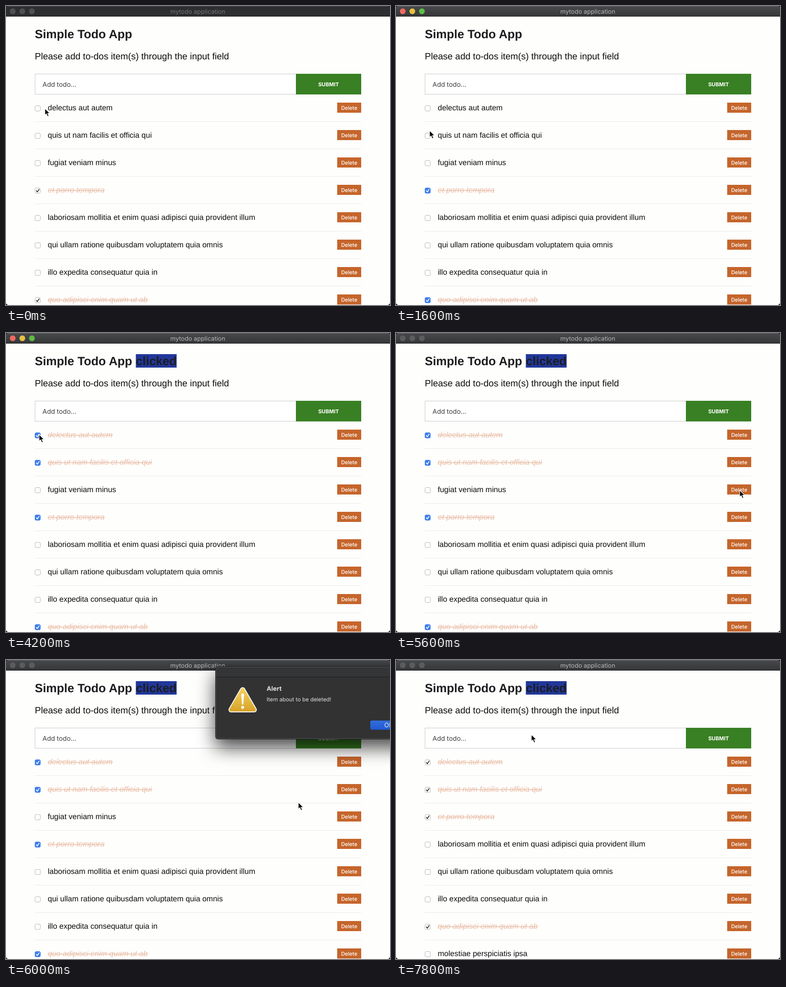
Recreate the animation shown at these times as an HTML page. Size 800 by 622 pixels, loop 8 s.

```html
<!DOCTYPE html>
<html lang="en">
<head>
<meta charset="utf-8">
<title>Todo app</title>
<style>
  html, body { margin: 0; width: 100%; height: 100%; overflow: hidden; background: #000; }
  svg { display: block; width: 800px; height: 622px; }
  text { font-family: "Liberation Sans", Arial, sans-serif; font-size: 16px; fill: #0c0c0c; text-rendering: geometricPrecision; }
  .ui { font-family: Inter, Roboto, sans-serif; }
  .mid { text-anchor: middle; }
  .done { font-style: italic; fill: #eabfa9; text-decoration: line-through; }
  .dialog { filter: drop-shadow(0 17px 19px rgba(0, 0, 0, .72)); }
</style>
</head>
<body>
<svg viewBox="0 0 800 622">
  <defs>
    <linearGradient id="bar" x2="0" y2="1"><stop stop-color="#48494b"/><stop offset="1" stop-color="#353637"/></linearGradient>
    <linearGradient id="gold" x2="0" y2="1"><stop stop-color="#f3cf5c"/><stop offset="1" stop-color="#d9a62b"/></linearGradient>
    <linearGradient id="blue" x2="0" y2="1"><stop stop-color="#336fdf"/><stop offset="1" stop-color="#2159d0"/></linearGradient>
    <linearGradient id="press" x2="0" y2="1"><stop stop-color="#4783ef"/><stop offset="1" stop-color="#326ee7"/></linearGradient>
  </defs>
  <rect width="800" height="622" rx="5" fill="#fefefd"/>
  <g id="scene"></g>
</svg>
<script>
const LOOP = 8000, STEP = 200;
const FOCUS = 1000, CHECK_2 = 2200, CHECK_1 = 3600, PRESS_DELETE = 5600,
      OPEN = 5800, PRESS_OK = 7000, CLOSE = 7200;

// text, time at which it is ticked, time at which it is removed
const todos = [
  ['delectus aut autem', CHECK_1],
  ['quis ut nam facilis et officia qui', CHECK_2],
  ['fugiat veniam minus', LOOP, CLOSE],
  ['et porro tempora', 0],
  ['laboriosam mollitia et enim quasi adipisci quia provident illum', LOOP],
  ['qui ullam ratione quibusdam voluptatem quia omnis', LOOP],
  ['illo expedita consequatur quia in', LOOP],
  ['quo adipisci enim quam ut ab', 0],
  ['molestiae perspiciatis ipsa', LOOP]
];

// time, x, y of the pointer tip
const path = [
  [0, 81, 213], [800, 81, 213], [1600, 70, 259], [2200, 69, 263],
  [3000, 81, 216], [3400, 69, 211], [4200, 69, 211], [5400, 716, 327],
  [5600, 716, 327], [6000, 609, 296], [6800, 784, 138], [7000, 786, 139],
  [7200, 786, 139], [7800, 282, 155], [8000, 282, 155]
];

const scene = document.getElementById('scene');
const rect = (x, y, w, h, fill, more = '') =>
  `<rect x="${x}" y="${y}" width="${w}" height="${h}" fill="${fill}" ${more}/>`;
const text = (x, y, str, style = '', cls = '') =>
  `<text x="${x}" y="${y}" class="${cls}" style="${style}">${str}</text>`;

function titleBar(t) {
  const fresh = t < FOCUS, active = !fresh && t < PRESS_DELETE;
  const lights = active ? ['#ed6a5e', '#e6c043', '#5cbc45'] : Array(3).fill(fresh ? '#505153' : '#5b5c5e');
  return `<path d="M0 22V5Q0 0 5 0H795Q800 0 800 5V22z" fill="${fresh ? '#2d2e2f' : 'url(#bar)'}"/>` +
    rect(4, 0, 792, 1, fresh ? '#4a4b4c' : '#68696a') + rect(0, 21, 800, 1, '#1b1b1c') +
    lights.map((c, i) => `<circle cx="${14 + 20 * i}" cy="11" r="6" fill="${c}"/>`).join('') +
    text(399.5, 16, 'mytodo application', `font-size:12.7px;fill:${fresh ? '#747576' : '#b9babb'}`, 'ui mid');
}

function header(t) {
  const badge = t < CHECK_2 ? '' :
    rect(270.5, 44, 85, 28, t < CHECK_1 ? '#e64bc0' : '#21379a') +
    text(270.6, 67, 'clicked', 'font-weight:bold;font-size:25px;fill:#1d1d20');
  return text(60, 67, 'Simple Todo App', 'font-weight:bold;font-size:25px;fill:#1d1d20') + badge +
    text(60, 110.7, 'Please add to-dos item(s) through the input field', 'font-size:19px') +
    rect(60.5, 141.5, 544, 42, '#fff', 'stroke="#c9c9c9"') +
    text(76, 168, 'Add todo...', 'font-size:13.6px;fill:#3c3c3c', 'ui') +
    rect(604, 141, 136, 43, '#388023') +
    text(672, 167, 'SUBMIT', 'font-size:11px;font-weight:700;fill:#fff', 'ui mid');
}

function checkbox(y, on, active) {
  const fill = on && active ? '#3f80ee' : '#fff';
  const edge = on && active ? '#3877e4' : '#b9b9b9';
  const tick = on ? `<path d="M63.2 ${y + .3}l2.1 2.6 3.8-5.8" fill="none" stroke="${active ? '#fff' : '#222'}" stroke-width="1.6" stroke-linecap="round" stroke-linejoin="round"/>` : '';
  return rect(60.5, y - 5.5, 11, 11, fill, `rx="2.5" stroke="${edge}"`) + tick;
}

function list(t) {
  const active = t >= FOCUS && t < CLOSE;
  return todos.filter(d => !(t >= d[2])).slice(0, 8).map(([str, at], i) => {
    const y = 57 * i, on = t >= at;
    return checkbox(213 + y, on, active) +
      text(87, 217 + y, str, '', on ? 'done' : '') +
      rect(690, 201 + y, 50, 21, '#c5652b') +
      text(715, 216 + y, 'Delete', 'font-size:11px;font-weight:500;fill:#fff', 'ui mid') +
      rect(60, 240 + y, 680, 1, '#ebeaee');
  }).join('');
}

function dialog(t) {
  if (t < OPEN || t >= CLOSE) return '';
  const sign = (color, width) =>
    `<path d="M493 62L517 103.5H469z" fill="${color}" stroke="${color}" stroke-width="${width}" stroke-linejoin="round"/>`;
  return `<g class="dialog">${rect(436, 13, 432, 152, '#18181a', 'rx="6"')}</g>` +
    rect(437, 14, 430, 150, '#323233', 'rx="5"') +
    `<path d="M437 35V19Q437 14 442 14H800V35z" fill="#343536"/>` +
    rect(437, 35, 363, 1, '#1c1c1d') +
    rect(437.5, 14.5, 429, 149, 'none', 'rx="4.5" stroke="#58595a"') +
    sign('#f6f4ec', 11) + sign('url(#gold)', 7) +
    `<path d="M490 71.5Q493 67.5 496 71.5L494.4 92Q493 94 491.6 92z" fill="#fff"/>
     <circle cx="493" cy="98.5" r="3.1" fill="#fff"/>` +
    text(543, 64, 'Alert', 'font-size:13px;font-weight:700;fill:#e2e2e2', 'ui') +
    text(543, 86, 'Item about to be deleted!', 'font-size:11.4px;fill:#e2e2e2', 'ui') +
    rect(759, 126, 80, 19, `url(#${t < PRESS_OK ? 'blue' : 'press'})`, 'rx="3.5"') +
    text(788, 140, 'OK', 'font-size:13px;fill:#e8eefb', 'ui');
}

function pointer(t) {
  const i = path.findIndex((p, n) => n && t <= p[0]);
  const [t0, x0, y0] = path[i - 1], [t1, x1, y1] = path[i];
  const k = (t - t0) / (t1 - t0), e = k * k * (3 - 2 * k);
  return `<path transform="translate(${x0 + (x1 - x0) * e} ${y0 + (y1 - y0) * e})"
    d="M0 0V14.2L3.2 11.2L5.6 16.9L8.2 15.8L5.8 10.2H10.2z"
    fill="#000" stroke="#fff" stroke-width="1.1" stroke-linejoin="round"/>`;
}

let last = -1;
function draw(now) {
  const t = Math.floor(now % LOOP / STEP) * STEP;
  if (t !== last) {
    last = t;
    scene.innerHTML = titleBar(t) + header(t) + list(t) + dialog(t) + pointer(t);
  }
  requestAnimationFrame(draw);
}
draw(0);
</script>
</body>
</html>
```
